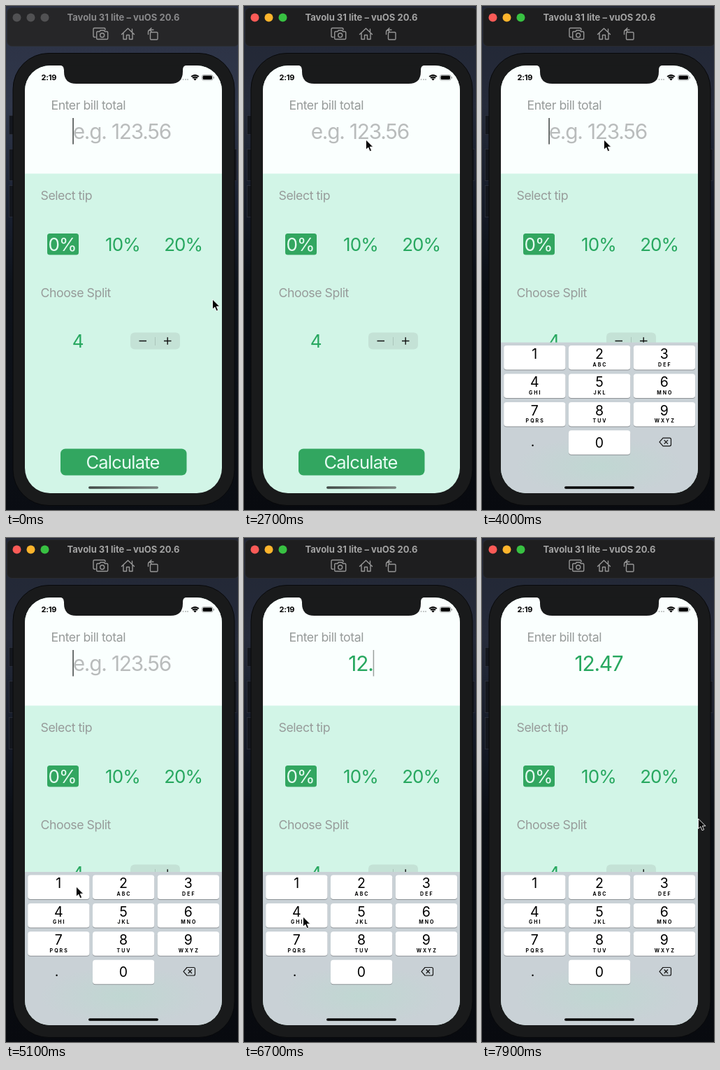
These frames come from a looping animation (332x720 px, 8 s). An HTML page:

```html
<!DOCTYPE html>
<html lang="en">
<head>
<meta charset="utf-8">
<title>Bill splitter</title>
<style>
html, body { margin: 0; width: 100%; height: 100%; overflow: hidden; background: #0b0e16; }
svg { display: block; font-family: Inter, Roboto, sans-serif; }
.label { font-size: 17.7px; letter-spacing: -.025em; fill: #979b9a; }
.choice { font-size: 26px; letter-spacing: -.035em; fill: #28a860; text-anchor: middle; }
.amount { font-size: 29.8px; letter-spacing: -.04em; }
.digit { font-size: 19.5px; text-anchor: middle; }
.letters { font-size: 7px; font-weight: 700; letter-spacing: 2px; text-anchor: middle; }
.icon { fill: none; stroke: #979797; stroke-width: 1.4; stroke-linejoin: round; stroke-linecap: round; }
</style>
</head>
<body>
<svg width="332" height="720" viewBox="0 0 332 720">
  <defs>
    <linearGradient id="night" x2="0" y2="1">
      <stop offset="0" stop-color="#2b3144"/>
      <stop offset=".2" stop-color="#30374a"/>
      <stop offset=".38" stop-color="#1c2334"/>
      <stop offset=".55" stop-color="#0e131b"/>
      <stop offset="1" stop-color="#0a0d13"/>
    </linearGradient>
    <radialGradient id="tint">
      <stop offset="0" stop-color="#c0d7d2"/>
      <stop offset="1" stop-color="#c0d7d2" stop-opacity="0"/>
    </radialGradient>
    <linearGradient id="homeShade">
      <stop offset="0" stop-color="#414946"/>
      <stop offset="1" stop-color="#77827e"/>
    </linearGradient>
    <clipPath id="screen"><rect x="27" y="85" width="282" height="611" rx="36"/></clipPath>
  </defs>

  <rect width="332" height="720" fill="url(#night)"/>
  <rect id="shadow" width="332" height="720"/>
  <g fill="#14171e" stroke="#2d313c" stroke-width=".8">
    <rect x="4.5" y="156.5" width="8" height="27"/>
    <rect x="4.5" y="204.5" width="8" height="45"/>
    <rect x="4.5" y="256.5" width="8" height="45"/>
    <rect x="322" y="204.5" width="8" height="45"/>
  </g>

  <rect id="bar" x="1.5" y="2.5" width="332" height="55" rx="7" stroke="#303135" stroke-width=".6"/>
  <g id="lights">
    <circle cx="15.500" cy="16.500" r="6"/><circle cx="35.500" cy="16.500" r="6"/><circle cx="55.500" cy="16.500" r="6"/>
  </g>
  <text id="title" x="168" y="21" font-size="13" font-weight="700" text-anchor="middle">Tavolu 31 lite – vuOS 20.6</text>
  <g class="icon" transform="translate(0 -.5)">
    <path d="M128 45h-1.500q-1.500 0-1.500-1.500v-10q0-1.500 1.500-1.500h14q1.500 0 1.500 1.500v1"/>
    <path d="M131 37h3l1.200-1.800h5l1.200 1.800h3q1.300 0 1.300 1.300v8.400q0 1.300-1.300 1.300h-13.400q-1.300 0-1.300-1.300v-8.400q0-1.300 1.300-1.300z"/>
    <circle cx="137.700" cy="42.300" r="3"/>
    <path d="M165.500 41l9-8.500 9 8.500M168 39v9h4.500v-6h4v6h4.500v-9M180.500 37v-3.500"/>
    <rect x="206.500" y="38" width="10.500" height="10.500" rx="1.200"/>
    <path d="M203.500 41v-3q0-3.500 3.500-3.500h4M208 32l-2.500 2.500 2.500 2.500"/>
  </g>

  <rect x="10" y="67.500" width="317" height="646" rx="51" fill="#191a1b" stroke="#08090b"/>
  <g clip-path="url(#screen)">
    <rect x="27" y="85" width="282" height="611" fill="#d2f5e7"/>
    <rect x="27" y="85" width="282" height="154.500" fill="#fafffe"/>
    <text x="50.500" y="106" font-size="11" font-weight="700" letter-spacing="-.2">2:19</text>
    <g fill="#b5b9b8">
      <circle cx="250" cy="105" r="1"/><circle cx="253.500" cy="105" r="1"/>
      <circle cx="257" cy="105" r="1"/><circle cx="260" cy="105" r="1"/>
    </g>
    <path d="M270.500 106.500l-6-6.300q6-5 12 0z"/>
    <path d="M265.500 102.200q5-4 10 0M267.300 104.200q3.200-2.500 6.400 0" fill="none" stroke="#fafffe" stroke-width=".7"/>
    <rect x="280.500" y="98.500" width="15.500" height="7.500" rx="2.300" fill="none" stroke="#8c8f8e" stroke-width=".8"/>
    <rect x="281.600" y="99.600" width="13.300" height="5.300" rx="1.300"/>
    <path d="M297.300 101v2.600" stroke="#8c8f8e"/>

    <text class="label" x="64.500" y="148">Enter bill total</text>
    <text class="amount" id="hint" x="95.700" y="190" fill="#b9bcbc">e.g. 123.56</text>
    <text class="amount" id="typed" x="167" y="190" fill="#28a860" text-anchor="middle"></text>
    <rect id="caret" y="160" width="1.500" height="37.500" fill="#3e4341"/>

    <text class="label" x="49.500" y="277">Select tip</text>
    <rect x="59" y="325" width="45" height="30.500" rx="3.500" fill="#32a660"/>
    <text class="choice" x="80.600" y="350" style="fill:#e3faf0">0%</text>
    <text class="choice" x="167" y="350">10%</text>
    <text class="choice" x="253.700" y="350">20%</text>
    <text class="label" x="49.500" y="416">Choose Split</text>
    <text class="choice" x="102.700" y="488">4</text>
    <rect x="178" y="466.500" width="71" height="24" rx="6" fill="#c4e2d6"/>
    <path d="M213.500 473v12" stroke="#aac5bb"/>
    <path d="M190.500 478.500h10.500M226 478.500h10.500M231.200 473.300v10.500" stroke="#111" stroke-width="1.400"/>
    <rect x="78" y="632.500" width="180.500" height="38" rx="7" fill="#32a660"/>
    <text x="114.500" y="661" font-size="25.500" letter-spacing="-.8" fill="#e8fcf4">Calculate</text>

    <g id="keyboard">
      <rect x="27" y="477" width="282" height="240" fill="#c9d1d6"/>
      <ellipse cx="168" cy="654" rx="120" ry="42" fill="url(#tint)"/>
      <g id="keys"></g>
      <path d="M259 613.500h9.500q2 0 2 2v7.500q0 2-2 2h-9.500l-5-5.700zM260.700 616.500l5.300 5.500M266 616.500l-5.300 5.500" fill="none" stroke="#151515" stroke-width="1.200" stroke-linejoin="round"/>
    </g>
    <rect id="home" x="118" y="686.200" width="100" height="3.600" rx="1.800"/>
  </g>
  <path d="M76 84.500q7 0 7 7v2q0 17.500 17.500 17.500h135q17.500 0 17.500-17.500v-2q0-7 7-7z" fill="#191a1b"/>
  <path id="pointer" d="M-.5 0v14.200l3.300-3 2.300 5.500 2.500-1.100-2.300-5.300h4.500z" fill="#050505" stroke="#fff" stroke-width=".9" stroke-linejoin="round"/>
</svg>
<script>
const LOOP = 8000, STEP = 100, ACTIVATE = 2600, KEYBOARD_START = 3668, KEYBOARD_RISE = 219;
const $ = id => document.getElementById(id);
const make = (parent, tag, attrs, text = '') => {
  const node = document.createElementNS('http://www.w3.org/2000/svg', tag);
  for (const name in attrs) node.setAttribute(name, attrs[name]);
  node.textContent = text;
  parent.appendChild(node);
  return node;
};

const letters = ['', 'ABC', 'DEF', 'GHI', 'JKL', 'MNO', 'PQRS', 'TUV', 'WXYZ'];
const keyCaps = {};
function addKey(digit, column, row, sub) {
  const x = 31.2 + column * 92.8, y = 481.5 + row * 40.4;
  make($('keys'), 'rect', { x, y: y + 1, width: 88.3, height: 34.5, rx: 4, fill: '#8d9296' });
  keyCaps[digit] = make($('keys'), 'rect', { x, y, width: 88.3, height: 34.5, rx: 4 });
  make($('keys'), 'text', { class: 'digit', x: x + 44, y: y + (digit ? 18.8 : 24.3) }, digit);
  make($('keys'), 'text', { class: 'letters', x: x + 45, y: y + 29.5 }, sub);
}
letters.forEach((sub, i) => addKey(i + 1, i % 3, Math.floor(i / 3), sub));
addKey(0, 1, 3, '');
make($('keys'), 'text', { class: 'digit', x: 72.5, y: 625.5 }, '.');

// Pointer stops: time, x, y
const stops = [
  [0, 296, 419], [1900, 296, 419], [2600, 175, 191], [4400, 175, 191],
  [5000, 101, 498], [5300, 101, 498], [5600, 148, 500], [5700, 148, 500],
  [6100, 72, 611], [6200, 72, 611], [6600, 85, 541], [6900, 85, 541],
  [7100, 80, 566], [7300, 80, 566], [7800, 310, 401], [LOOP, 310, 401]
];
const entries = [[5300, '1'], [5700, '2'], [6200, '.'], [6900, '4'], [7200, '7']];

const clamp = v => Math.min(1, Math.max(0, v));
const ease = v => v * v * (3 - 2 * v);

function pointerAt(t) {
  const i = stops.findIndex(stop => stop[0] > t);
  const [t0, x0, y0] = stops[i - 1], [t1, x1, y1] = stops[i];
  const k = ease((t - t0) / (t1 - t0));
  return `translate(${x0 + (x1 - x0) * k} ${y0 + (y1 - y0) * k})`;
}

// Critically damped spring
function keyboardOffset(t) {
  const s = Math.max(0, t - KEYBOARD_START) / 1000 * Math.sqrt(1000 / 3);
  return KEYBOARD_RISE * (1 + s) * Math.exp(-s);
}

function blink(elapsed) {
  const phase = elapsed % 1000 / 1000;
  return phase < .7 ? clamp((.6 - phase) / .2) : clamp((phase - .8) / .15);
}

function render(t) {
  const active = t >= ACTIVATE;
  $('shadow').setAttribute('opacity', active ? .22 : 0);
  $('bar').setAttribute('fill', active ? '#1e1e1f' : '#262628');
  $('title').setAttribute('fill', active ? '#a3a3a3' : '#88888a');
  const colors = active ? ['#fc5b57', '#fdb42c', '#38c142'] : Array(3).fill('#515153');
  [...$('lights').children].forEach((light, i) => light.setAttribute('fill', colors[i]));

  $('keyboard').setAttribute('transform', `translate(0 ${keyboardOffset(t)})`);
  $('home').setAttribute('fill', t < KEYBOARD_START ? 'url(#homeShade)' : '#000');

  const done = entries.filter(([time]) => time <= t);
  $('hint').setAttribute('visibility', done.length ? 'hidden' : 'visible');
  $('typed').textContent = done.map(([, char]) => char).join('');
  const caretX = done.length ? 167 + $('typed').getComputedTextLength() / 2 : 95.3;
  $('caret').setAttribute('x', caretX);
  $('caret').setAttribute('opacity', blink(done.length ? t - done[done.length - 1][0] : t + 50));

  for (const digit in keyCaps) {
    const pressed = entries.some(([time, char]) => char === digit && t >= time - 100 && t < time);
    keyCaps[digit].setAttribute('fill', pressed ? '#b3b9c1' : '#fff');
  }
  $('pointer').setAttribute('transform', pointerAt(t));
}

const start = performance.now();
function tick() {
  const t = (performance.now() - start) % LOOP;
  render(Math.floor(t / STEP) * STEP);
  requestAnimationFrame(tick);
}
tick();
</script>
</body>
</html>
```
